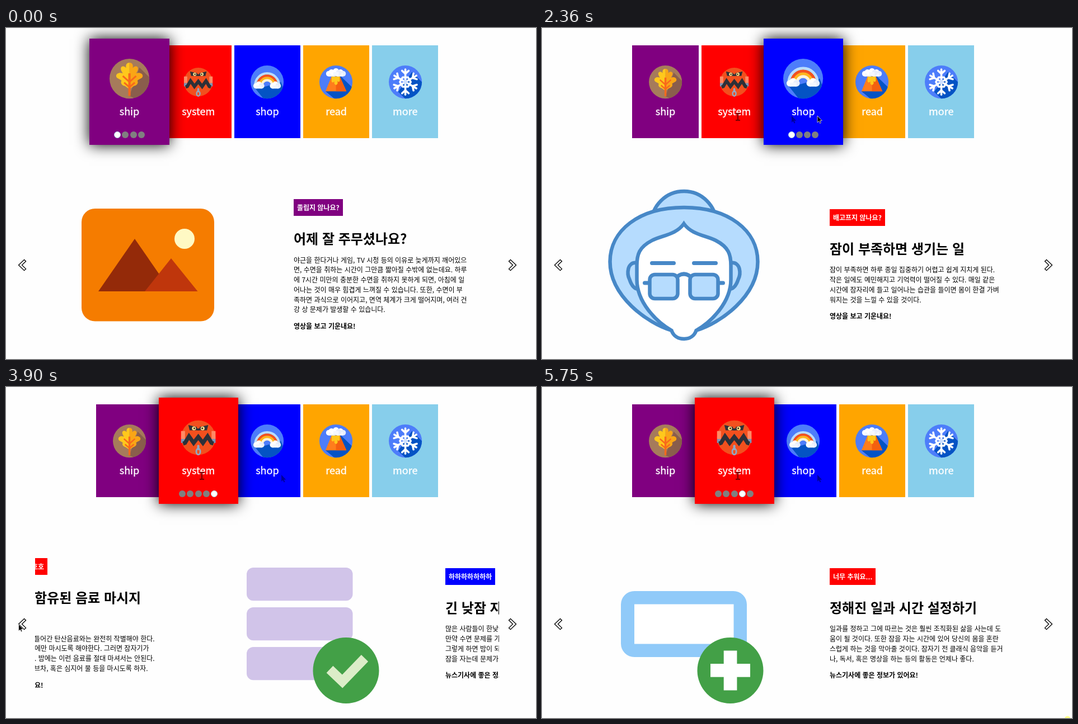
An HTML page that plays this animation: 947 px wide and 592 px high, repeating every 5.83 s.

```html
<!DOCTYPE html>
<html lang="ko">
<head>
<meta charset="utf-8">
<style>
html, body { margin: 0; width: 100%; height: 100%; overflow: hidden; background: #fefefe; }
body { font: 12px/17.78px "Noto Sans CJK KR", "Noto Sans CJK JP", "Noto Sans", sans-serif; color: #000; }
#stage { position: absolute; left: 0; top: 0; width: 947px; height: 592px; overflow: hidden; }
.card { position: absolute; top: 31px; width: 118.3px; height: 166px; padding-top: 36px; box-sizing: border-box; text-align: center; color: #fff; }
.card.on { z-index: 1; margin: -12px; width: 142.3px; height: 190px; box-shadow: 0 0 25px #000; }
.card svg { display: block; width: 50%; aspect-ratio: 1; margin: auto; overflow: visible; }
.card b { display: block; margin-top: 9px; font-size: 18px; font-weight: 400; line-height: 26px; -webkit-text-stroke: .35px #fff; }
.dots { display: none; justify-content: center; gap: 2.2px; margin-top: 24px; }
.on .dots { display: flex; }
.dots i { width: 12px; height: 12px; border-radius: 50%; background: gray; box-sizing: border-box; }
.dots i.now { background: #fff; border: 1.5px solid lightblue; }
#view { position: absolute; left: 52px; top: 284px; width: 829px; height: 290px; overflow: hidden; }
.slide { position: absolute; top: 0; width: 829px; height: 290px; }
.slide svg { position: absolute; left: 0; top: 0; }
.text { position: absolute; left: 462px; top: 0; height: 280px; display: flex; flex-direction: column; justify-content: center; align-items: flex-start; white-space: pre; }
.text span { padding: 6px; color: #fff; font-weight: 700; }
.text h2 { margin: 23px 0 12px; font-size: 24px; line-height: 34.75px; }
.text p { margin: 0 0 12px; }
#over { position: absolute; left: 0; top: 0; z-index: 2; }
</style>
</head>
<body>
<div id="stage">
  <div id="view"><div id="strip"></div></div>
  <svg id="over" width="947" height="592">
    <defs>
      <clipPath id="disc"><circle cx="30" cy="30" r="30"/></clipPath>
      <path id="chev" d="M32.5 414.5L22.5 424 32.5 433.7 35.5 430.9 28.5 424 35.5 417.2Z" fill="#fff" stroke="#000" stroke-width="1.3"/>
      <path id="tip" d="M0 0V12L2.8 9.5 4.5 13.5 6.4 12.7 4.7 8.8H8.3Z"/>
      <path id="beam" d="M-4 -6H4M0 -6V6M-4 6H4" fill="none"/>
    </defs>
    <use href="#chev"/><use href="#chev" transform="matrix(-1 0 0 1 934 0)"/>
    <use id="g0" href="#beam" x="350" y="159" stroke="#700" stroke-width="2"/>
    <use id="g1" href="#tip" x="446" y="157" fill="#009"/>
    <use id="g2" href="#tip" x="492" y="157" fill="#009"/>
    <g id="cursor">
      <use id="arrow" href="#tip" stroke="#fff" stroke-width=".7"/>
      <g id="caret"><use href="#beam" stroke="#fff" stroke-width="3"/><use href="#beam" stroke="#333" stroke-width="1.5"/></g>
    </g>
    <circle id="spot" cx="939" cy="594" r="5.5" fill="#ff8"/>
  </svg>
</div>
<script>
const $ = id => document.getElementById(id);
const rect = (x, y, w, h, fill, r = 0) => `<rect x="${x}" y="${y}" width="${w}" height="${h}" rx="${r}" fill="${fill}"/>`;
const circle = (x, y, r, fill) => `<circle cx="${x}" cy="${y}" r="${r}" fill="${fill}"/>`;
const path = (d, fill, more = '') => `<path d="${d}" fill="${fill}" ${more}/>`;
const line = (d, color, w, more = '') => path(d, 'none', `stroke="${color}" stroke-width="${w}" ${more}`);
const mirror = (cx, s) => `<g transform="translate(${cx})">${s}<g transform="scale(-1 1)">${s}</g></g>`;
const disc = (color, shade, d) => circle(30, 30, 30, color) + path(d, shade, 'clip-path="url(#disc)"');
const blueDisc = d => disc('#4d7dfa', '#0453c4', d);
const cloud = (x, y) => circle(x - 5, y + 1, 5, '#fff') + circle(x, y - 2, 5, '#fff') + circle(x + 5, y + 1, 5, '#e8eefc') + rect(x - 5, y, 10, 6, '#f4f7ff');

const halfLeaf = 'M0 6C4 6 6 9 5 14C8 10 13 11 13 15C13 18 11 20 10 22C15 20 20 22 20 26C20 30 15 30 12 33C14 37 11 40 7 41L0 46Z';
const leaf = disc('#a67b5b', '#8a5e4c', 'M45 13L75 43 60 70 30 56Z') +
  `<g transform="translate(30)">${path(halfLeaf, '#f9a616')}<g transform="scale(-1 1)">${path(halfLeaf, '#ffc81c')}</g></g>` +
  line('M30 22V56', '#f8691c', 3.5) + line('M20 26L30 35 40 26M22 36L30 43 38 36', '#f8691c', 2.5);
const beast = circle(30, 30, 26, '#f2501e') +
  mirror(30, rect(-26, 20, 6, 12, '#ff8a65') + rect(-26, 32, 6, 6, '#7d95b8') +
    path('M-15 11L-2 14V16H2V19H-13Z', '#2d3038') + circle(-6.5, 16, 3, '#ffe08a') + circle(-6, 16, 1.2, '#222')) +
  line('M7 39L10 38 16 28 23 38 30 29 37 38 44 28 50 38 53 39', '#2d3038', 6) +
  rect(28.3, 41, 3.4, 8, '#8fa9c9', 1.5) + `<ellipse cx="30" cy="51" rx="3" ry="4.5" fill="none" stroke="#8fa9c9" stroke-width="2.4"/>`;
const arc = (r, c) => line(`M${30 - r} 36A${r} ${r} 0 0 1 ${30 + r} 36`, c, 4.4);
const rainbow = blueDisc('M8 41L28 66 66 60 55 30 42 34 20 40Z') +
  arc(21.5, '#b9dcff') + arc(17.3, '#f4511e') + arc(13.2, '#ffb51c') + arc(9.2, '#fff3d6') + cloud(15, 36) + cloud(45, 36);
const volcano = blueDisc('M37 18L70 50 45 75 11 47Z') +
  path('M22 20H37L49 47H11Z', '#ff7d1c') + path('M30 20H37L49 47H30Z', '#f4600f') +
  path('M22 20H37V28Q35 32 33 28V33Q30 38 27 33V29Q24 33 22 29Z', '#ffc71c') + cloud(22, 14) + cloud(38, 14) + cloud(30, 12);
const arms = [0, 60, 120, 180, 240, 300].map(a =>
  `<g transform="rotate(${a} 30 30)">${line('M30 30V7M24 9.5L30 15 36 9.5M25.5 21.5H34.5', '#fff', 3.6, 'stroke-linecap="round"')}</g>`).join('');
const flake = blueDisc('M42 12L75 45 45 75 17 48Z') + arms + circle(30, 30, 3.5, '#cfe0ff');

const cards = [['ship', 'purple', 4, leaf], ['system', 'red', 5, beast], ['shop', 'blue', 4, rainbow], ['read', 'orange', 4, volcano], ['more', 'skyblue', 4, flake]]
  .map(([name, color, count, icon], i) => {
    const el = document.createElement('div');
    el.style.cssText = `left:${161.3 + 123.2 * i}px;background:${color}`;
    el.innerHTML = `<svg viewBox="0 0 60 60">${icon}</svg><b>${name}</b><div class="dots">${'<i></i>'.repeat(count)}</div>`;
    $('stage').append(el);
    return el;
  });

const mountains = rect(135, 323, 237, 201.5, '#f57c00', 24) + circle(319, 377, 18, '#fff9c4') +
  path('M230 377L295 471H165Z', '#942a09') + path('M295 412L342.5 471H248Z', '#bf360c');
const clock = circle(253.5, 424, 100, '#90caf9') + circle(253.5, 424, 78, '#fff') + line('M253.5 370V424L290 446', '#1976d2', 12);
const ink = 'stroke="#4788c7" stroke-width="6.5"', pale = '#b6dcfe';
const outlined = (d, fill) => path(d, fill, ink);
const lady = `<g transform="translate(253.5)"><circle cy="350" r="58" fill="${pale}" ${ink}/>` +
  outlined('M-22 541C-65 528 -132 480 -132 418C-132 362 -80 321 0 321S132 362 132 418C132 480 65 528 22 541Z', pale) + '</g>' +
  mirror(253.5, outlined('M-84 420C-102 418 -102 440 -97 450C-93 462 -88 467 -81 467', pale)) +
  `<g transform="translate(253.5)">` +
  outlined('M0 350C-14 370 -40 371 -57 380C-80 392 -84 405 -84 425V450C-84 490 -50 525 -22 541C-19 550 -11 556 0 556S19 550 22 541C50 525 84 490 84 450V425C84 405 80 392 57 380C40 371 14 370 0 350Z', '#fff') + '</g>' +
  mirror(253.5, line('M-57 420.5H-18M-70 456H-62M-11 444Q-6 440 0 440', '#4788c7', 7, 'stroke-linecap="round"') +
    `<rect x="-61" y="441" width="50" height="43" rx="9" fill="${pale}" ${ink}/>`);
const cap = path('M252 336L391 384V389L252 441 113 387Z', '#000') +
  path('M252 452L347 414V462C347 490 300 503 252 503S157 490 157 462V414Z', '#000') +
  line('M385 386V460', '#000', 9) + circle(385, 464, 11, '#000') +
  path('M385 472C377 483 373 498 374 504C376 514 394 514 395.5 504C396 498 393 483 385 472Z', '#000');
const badge = circle(336.5, 507, 59, '#43a047');
const plus = rect(141, 365, 225, 118, '#90caf9', 24) + rect(165, 388.5, 177.5, 71, '#fff') + badge +
  rect(324.7, 471.5, 23.7, 71, '#fff') + rect(301, 495, 71, 23.7, '#fff');
let calendar = rect(142, 318, 224.5, 212.5, '#cfd8dc', 24) + path('M142 377V342A24 24 0 0 1 166 318H342.5A24 24 0 0 1 366.5 342V377Z', '#f44336');
for (const x of [201, 307.5]) calendar += circle(x, 341, 18, '#b71c1c') + rect(x - 12, 300, 24, 53, '#b0bec5', 12);
for (let i = 0; i < 12; i++) calendar += rect(189 + i % 4 * 35.5, 400.5 + (i >> 2) * 35.5, 23.7, 23.7, '#90a4ae');
const checklist = [323, 394, 465].map(y => rect(159, y, 189.5, 59.3, '#d1c4e9', 12)).join('') + badge +
  line('M307.5 505L330 526.5 370 485', '#dcedc8', 17);

const video = '영상을 보고 기운내요!', news = '뉴스기사에 좋은 정보가 있어요!';
const slides = [
  [mountains, 'purple', '졸립지 않나요?', '어제 잘 주무셨나요?', '야근을 한다거나 게임, TV 시청 등의 이유로 늦게까지 깨어있으\n면, 수면을 취하는 시간이 그만큼 짧아질 수밖에 없는데요. 하루\n에 7시간 미만의 충분한 수면을 취하지 못하게 되면, 아침에 일\n어나는 것이 매우 힘겹게 느껴질 수 있습니다. 또한, 수면이 부\n족하면 과식으로 이어지고, 면역 체계가 크게 떨어지며, 여러 건\n강 상 문제가 발생할 수 있습니다.', video],
  [clock, 'purple', '피곤한가요?', '충분한 휴식 취하기', '하루를 마치고 나면 몸과 마음이 함께 쉬어야 한다. 잠깐이라도\n조용한 곳에서 눈을 감고 천천히 숨을 쉬어 보자. 긴장이 풀리고\n다음 날을 준비하는 힘이 생길 것이다.', news],
  [checklist, 'purple', '일어나세요', '아침 햇빛 쬐기', '아침에 일어나서 햇빛을 쬐면 몸이 하루의 시작을 알게 된다.\n창문을 열고 가볍게 몸을 움직이는 것만으로도 잠이 깨고 밤에는\n더 쉽게 잠들 수 있을 것이다.', video],
  [clock, 'purple', '언제 끝날까요', '계절의 변화', '계절의 변화가 반드시 모든 사람에게 같은 방식으로 영향을 미\n치는 것은 아니다. 일반적으로 영향을 받는 사람들은 보통 몇주\n동안은 정상적으로 잠을 잘 수 있을 것이다. 그 후 긴장을 풀고\n상황에 의해 흥분하지 않는 법을 배우는 것에 대한 문제이다.', news],
  [lady, 'red', '배고프지 않나요?', '잠이 부족하면 생기는 일', '잠이 부족하면 하루 종일 집중하기 어렵고 쉽게 지치게 된다.\n작은 일에도 예민해지고 기억력이 떨어질 수 있다. 매일 같은\n시간에 잠자리에 들고 일어나는 습관을 들이면 몸이 한결 가벼\n워지는 것을 느낄 수 있을 것이다.', video],
  [mountains, 'red', '힘내세요', '편안한 잠자리 만들기', '방을 어둡고 조용하게 하고 알맞은 온도를 유지하는 것이 좋다.\n편안한 이불과 베개를 쓰면 더 깊이 잠들 수 있다. 잠들기 전에는\n밝은 화면을 보지 않도록 하자.', news],
  [cap, 'red', '집에... 갈까?', '숙면을 취하는 데 도움이 되는\n팁', '운동은 당신을 건강하게 만들기도 하지만, 당신을 지치게 하는\n좋은 방법이다. 당신의 몸은 운동 후 피로를 느낄 것이고 쉬고\n싶어질 것이다. 같은 효과가 마음에도 일어나 운동으로 인해 생\n긴 엔돌핀은 긍정적 효과를 만들어 낼 것이다.', video],
  [plus, 'red', '너무 추워요...', '정해진 일과 시간 설정하기', '일과를 정하고 그에 따르는 것은 훨씬 조직화된 삶을 사는데 도\n움이 될 것이다. 또한 잠을 자는 시간에 있어 당신의 몸을 혼란\n스럽게 하는 것을 막아줄 것이다. 잠자기 전 클래식 음악을 듣거\n나, 독서, 혹은 명상을 하는 등의 활동은 언제나 좋다.', news],
  [calendar, 'red', '에어컨 꺼주세요 호호', '카페인이 함유된 음료 마시지\n않기', '커피, 차, 카페인이 들어간 탄산음료와는 완전히 작별해야 한다.\n아니면 적어도 아침에만 마시도록 해야한다. 그러면 잠자기가\n훨씬 쉬워질 것이다. 밤에는 이런 음료를 절대 마셔서는 안된다.\n대신 주스, 우유, 허브차, 혹은 심지어 물 등을 마시도록 하자.', video],
  [checklist, 'blue', '하하하하하하하', '긴 낮잠 자지 않기', '많은 사람들이 한낮에 긴 낮잠을 잔다. 이는 좋을 수도 있지만,\n만약 수면 문제를 가지고 있다면, 이를 멈추려고 노력해야 한다.\n그렇게 하면 밤이 되면 훨씬 더 졸려움을 느낄 것이고, 제대로\n잠을 자는데 문제가 없을 것이다.', news]
];
$('strip').innerHTML = slides.map(([art, color, tag, title, body, end], i) =>
  `<div class="slide" style="left:${829 * i}px"><svg width="829" height="290" viewBox="52 284 829 290">${art}</svg>` +
  `<div class="text"><span style="background:${color}">${tag}</span><h2>${title}</h2><p>${body}</p><b>${end}</b></div></div>`).join('');

const LOOP = 5830, GLIDE = 500;
// start time, slides moved
const glides = [[1279.7, 4], [2439.8, 5], [3707.4, -1], [4533.9, -1]];
// start time, card, dot
const picks = [[0, 0, 0], [1210, 1, 0], [2360, 2, 0], [3670, 1, 4], [4533, 1, 3]];
// time, x, y
const track = [[120, 852, 559], [660, 560, 300], [1040, 350, 159], [1290, 350, 159], [1670, 361, 159], [1830, 361, 159], [2210, 492, 157],
  [2520, 492, 157], [2670, 379, 163], [3360, 14, 428], [3590, 22, 425], [4130, 23, 424], [4510, 23, 424], [4820, 589, 486], [5060, 942, 539]];

const swing = p => (1 - Math.cos(Math.PI * Math.min(1, Math.max(0, p)))) / 2;
const show = (id, on) => $(id).style.display = on ? '' : 'none';

function pointAt(t) {
  const i = track.findIndex(k => k[0] > t);
  if (i < 1) return i ? track.at(-1).slice(1) : track[0].slice(1);
  const [a, b] = [track[i - 1], track[i]], p = (t - a[0]) / (b[0] - a[0]);
  return [a[1] + (b[1] - a[1]) * p, a[2] + (b[2] - a[2]) * p];
}

function draw(t) {
  const at = glides.reduce((sum, [start, by]) => sum + by * swing((t - start) / GLIDE), 0);
  $('strip').style.transform = `translateX(${Math.round(-829 * at)}px)`;
  const [, card, dot] = picks.findLast(k => k[0] <= t);
  cards.forEach((el, i) => {
    el.className = i === card ? 'card on' : 'card';
    el.querySelectorAll('.dots i').forEach((d, j) => d.className = j === dot ? 'now' : '');
  });
  const [x, y] = pointAt(t), text = t > 1000 && t < 1850;
  $('cursor').setAttribute('transform', `translate(${x} ${y})`);
  show('cursor', t >= 120 && t < 5140);
  show('arrow', !text);
  show('caret', text);
  show('g0', t >= 1520);
  show('g1', t >= 2210 && t < 3670);
  show('g2', t >= 2520);
  show('spot', t >= 5750);
}

const begin = performance.now();
(function tick() {
  draw((performance.now() - begin) % LOOP);
  requestAnimationFrame(tick);
})();
</script>
</body>
</html>
```
